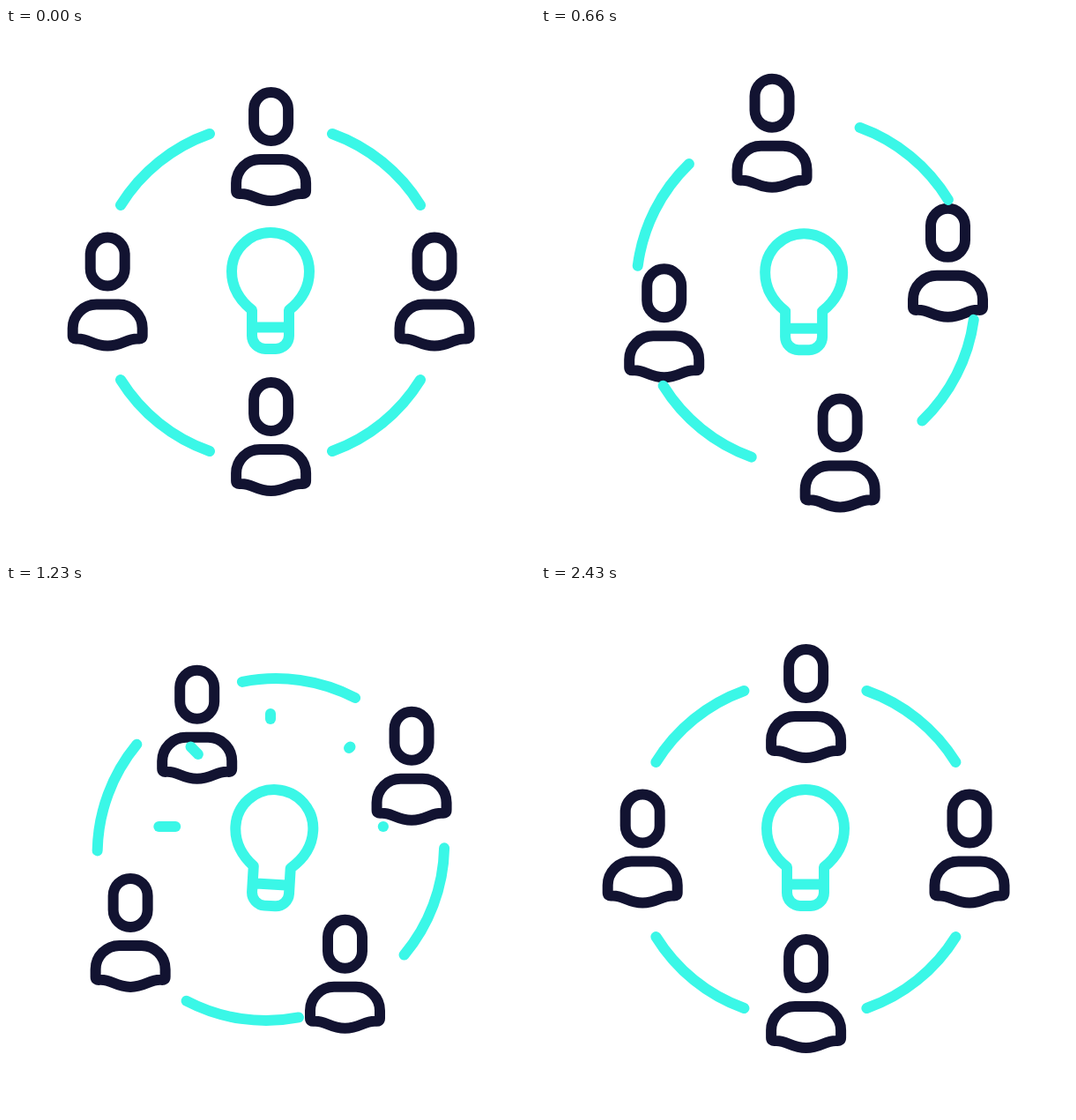
An HTML page that plays this animation: 600x600 px, repeating every 4460 ms.

```html
<!DOCTYPE html>
<html lang="en">
<head>
<meta charset="utf-8">
<title>Team idea</title>
<style>
  html, body { margin: 0; width: 100%; height: 100%; overflow: hidden; background: #fff; }
  svg { display: block; width: 100%; height: 100%; }
  g { fill: none; stroke-width: 12; stroke-linecap: round; stroke-linejoin: round; }
  .navy { stroke: #121331; }
  .cyan { stroke: #3af7e7; }
</style>
</head>
<body>
<svg viewBox="0 0 600 600">
  <defs>
    <g id="person">
      <rect x="-19.5" y="-61.5" width="39" height="55" rx="19.5"/>
      <path d="M-39.5 50V41.5A27 27 0 0 1 -12.5 14.5H12.5A27 27 0 0 1 39.5 41.5V50Q39.5 54 35 53.5C22 52.5 17 61.5 0 61.5S-22 52.5 -35 53.5Q-39.5 54 -39.5 50Z"/>
    </g>
  </defs>
  <g class="navy" id="people"></g>
  <g class="cyan">
    <path id="ring" d="M130 201A195 195 0 0 1 231 120M370 120A195 195 0 0 1 470 201M470 399A195 195 0 0 1 370 480M231 480A195 195 0 0 1 130 399"/>
    <path id="bulb" d="M279 339.5V320C264 308 256 293 256 276a44 44 0 0 1 88 0C344 293 336 308 321 320V339.5M279 339.5H321V349a15 15 0 0 1 -15 15H294a15 15 0 0 1 -15 -15Z"/>
    <g id="rays"></g>
  </g>
</svg>
<script>
const LOOP = 4460, STEP = 30, SPIN = 2430;
const RAD = Math.PI / 180;
const $ = id => document.getElementById(id);

function add(parent, tag, attrs = {}) {
  const el = document.createElementNS("http://www.w3.org/2000/svg", tag);
  for (const key in attrs) el.setAttribute(key, attrs[key]);
  return parent.appendChild(el);
}

const people = [0, 90, 180, 270].map((angle, i) => ({
  angle,
  radius: i % 2 ? 185.4 : 164.5,
  el: add($("people"), "use", { href: "#person" })
}));

// Rays fire one after another, from right to left.
const rays = [0, 45, 90, 135, 180].map((angle, i) => ({
  x: Math.cos(angle * RAD),
  y: -Math.sin(angle * RAD),
  start: 665 + 60 * i,
  el: add($("rays"), "path")
}));

const clamp = v => Math.min(1, Math.max(0, v));
const easeOut = p => 1 - Math.pow(1 - clamp(p), 2.2);

// Cubic Bezier easing with y handles at 0 and 1.
function spinEase(x) {
  if (x >= 1) return 1;
  let lo = 0, hi = 1;
  for (let i = 0; i < 30; i++) {
    const s = (lo + hi) / 2, r = 1 - s;
    const at = 3 * 0.331 * s * r * r + 3 * 0.127 * s * s * r + s * s * s;
    if (at < x) lo = s; else hi = s;
  }
  return lo * lo * (3 - 2 * lo);
}

// Sine easing between [time, value] keys.
function keyed(keys, t) {
  const i = keys.findIndex(k => k[0] > t);
  if (i < 0) return keys[keys.length - 1][1];
  const [t0, a] = keys[i - 1], [t1, b] = keys[i];
  return a + (b - a) * (0.5 - 0.5 * Math.cos(Math.PI * (t - t0) / (t1 - t0)));
}

const tiltKeys = [[0, 0], [380, 20.2], [895, -15.2], [1330, 6], [1850, -2], [2400, 0]];
const driftKeys = [[0, 0], [760, -2], [1250, 0]];
const dropKeys = [[0, 0], [360, 20.5], [820, -6], [1100, 0]];

function draw(t) {
  const turn = 180 * spinEase(t / SPIN);
  const midY = 299 + 1.6 * Math.sin(turn * RAD); // sags slightly mid-turn

  for (const { angle, radius, el } of people) {
    const a = (angle + turn) * RAD;
    const x = 300.6 + radius * Math.sin(a), y = midY - radius * Math.cos(a);
    el.setAttribute("transform", `translate(${x} ${y})`);
  }
  $("ring").setAttribute("transform", `rotate(${turn} 300.2 300)`);
  $("bulb").setAttribute("transform",
    `translate(${keyed(driftKeys, t)} ${keyed(dropKeys, t)}) rotate(${keyed(tiltKeys, t)} 300 350)`);

  for (const { x, y, start, el } of rays) {
    const age = t - start;
    const tail = 76 + 52 * easeOut((age - 175) / 430);
    const head = 76 + 52 * easeOut(age / 400);
    const point = r => `${300 + r * x} ${274 + r * y}`;
    el.setAttribute("d", `M${point(tail)}L${point(head)}`);
    el.setAttribute("visibility", age > 0 && age < 605 ? "visible" : "hidden");
  }
}

const begin = performance.now();
function tick() {
  const t = (performance.now() - begin) % LOOP;
  draw(Math.min(SPIN, Math.floor(t / STEP) * STEP));
  requestAnimationFrame(tick);
}
tick();
</script>
</body>
</html>
```
